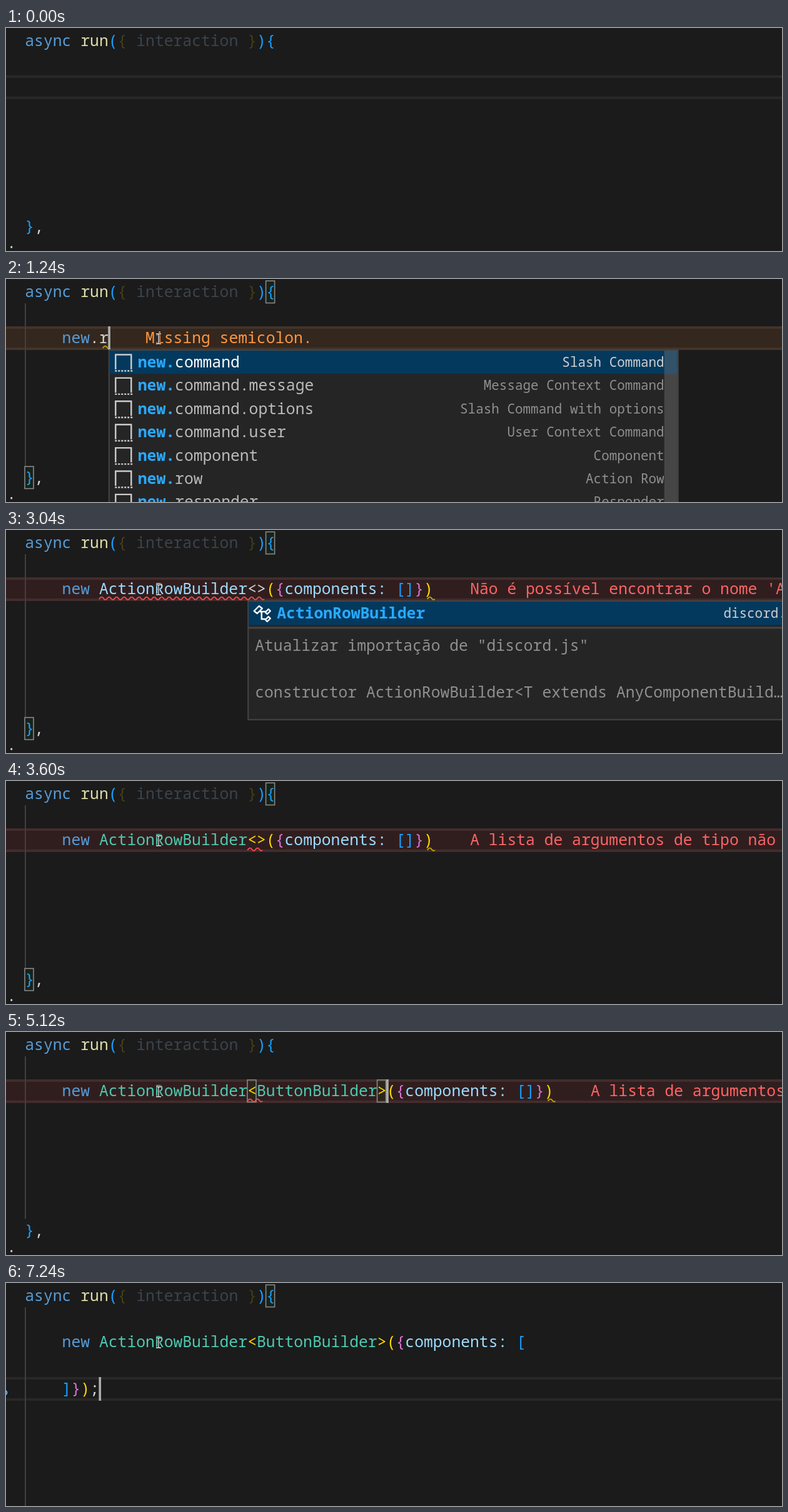
Write an HTML page that moves like this. It is 1241 px wide and 358 px high and loops after 7.32 s.

```html
<!DOCTYPE html>
<html lang="en">
<head>
<meta charset="utf-8">
<title>Editor snippet demo</title>
<style>
  html, body { margin: 0; width: 100%; height: 100%; overflow: hidden; background: #1b1b1b; }
  svg { display: block; width: 1241px; height: 358px; }
  text {
    font: 24.7px "Noto Sans Mono", "DejaVu Sans Mono", monospace;
    font-variant-ligatures: none;
    white-space: pre;
  }
  .bold { font-weight: 700; }
  .small { font-size: 20.95px; }
</style>
</head>
<body>
<svg id="stage" viewBox="0 0 1241 358"></svg>
<script>
const LOOP = 7320, CELL = 14.83;
const C = {
  key: '#569cd6', fn: '#dcdcaa', id: '#9cdcfe', type: '#4ec9b0', plain: '#d4d4d4',
  gold: '#ffd700', pink: '#da70d6', blue: '#179fff', dimGold: '#443f17', dim: '#3b434b',
  match: '#2aaaff', label: '#bbbbbb', note: '#8f8f8f', error: '#ff6464', warn: '#ff9640'
};
const TONES = {
  plain: { fill: 'none', edge: '#282828' },
  warn: { fill: '#33271e', edge: '#43342a', text: C.warn },
  error: { fill: '#301e1f', edge: '#432c2d', text: C.error }
};

const colX = col => 30.3 + col * CELL;
const rowY = row => Math.round(1.7 + row * 37.3);
const esc = s => s.replace(/&/g, '&amp;').replace(/</g, '&lt;');
const rect = (x, y, w, h, fill, more = '') =>
  `<rect x="${x}" y="${y}" width="${w}" height="${h}" fill="${fill}" ${more}/>`;
const path = (d, stroke, width = 2, more = '') =>
  `<path d="${d}" fill="none" stroke="${stroke}" stroke-width="${width}" ${more}/>`;
const text = (x, y, s, fill, more = '') =>
  `<text x="${x}" y="${y}" fill="${fill}" xml:space="preserve" ${more}>${esc(s)}</text>`;

function tokens(row, col, list) {
  let out = '';
  for (const [s, fill] of list) {
    out += text(colX(col), rowY(row) + 27, s, fill);
    col += s.length;
  }
  return out;
}

function squiggle(x1, x2, y, color) {
  let d = `M${x1} ${y + 3}`;
  for (let x = x1, up = true; x + 6 <= x2 + 2; x += 6, up = !up)
    d += `q3 ${up ? -5 : 5} 6 ${up ? -2.5 : 2.5}`;
  return path(d, color, 1.8);
}

// Completion popup
const ICONS = {
  keyword: () => path('M2 2H13V7H2ZM17 4H26M0 12H11M15 12H25M0 18H6M11 18H29M0 24H14M18 24H28', '#fff', 2.5),
  snippet: () => path('M3 25V1.5H28V25', '#ccc', 2.4) + path('M2 27.5H30', '#ccc', 2.4, 'stroke-dasharray="3 2"'),
  value: c => path('M7 5H2V24H7M23 5H28V24H23', c, 2.2) +
    path('M8 13L15 9L22 12L21 18L15 21L8 18ZM8 13L15 16L22 12M15 16V21', c, 2),
  iface: c => `<circle cx="4" cy="14" r="4.2" fill="${c}"/><circle cx="22" cy="14" r="5.6" fill="none" stroke="${c}" stroke-width="2.3"/>` +
    path('M8 14H16', c, 2.3),
  cls: c => path('M2 10L10 2L15 6L7 14ZM11 11H20M14 11V23H20M20 12L25 7L28 10L23 15ZM20 24L25 19L28 22L23 27Z', c, 2.4, 'stroke-linejoin="round"')
};
const ICON_COLORS = { value: '#75beff', iface: '#75beff', cls: '#ee9d28' };

function popup({ col, items, hits, right, notes, scroll }) {
  const x = colX(col) + 1, w = right - x, end = 114 + items.length * 37.4 + 5;
  let out = rect(x, 114, w, end - 114, '#252526', 'stroke="#454545" stroke-width="2"');
  out += rect(x + 1, 115, w - 2, 37.4, '#04395e');
  items.forEach(([icon, name, detail = ''], i) => {
    const top = 115 + i * 37.4, on = i === 0;
    const color = on ? '#fff' : ICON_COLORS[icon];
    out += `<g transform="translate(${x + 7.5} ${top + 5})">${ICONS[icon](color)}</g>`;
    out += text(x + 46, top + 27, name.slice(0, hits), C.match, 'class="bold"');
    out += text(x + 46 + hits * CELL, top + 27, name.slice(hits), on ? '#fff' : C.label);
    out += text(right - 22, top + 26, detail, on ? '#d0d0d0' : C.note, 'class="small" text-anchor="end"');
  });
  if (scroll) out += rect(right - 22, 115, 21, 243, 'rgba(121,121,121,.4)');
  if (notes) {
    out += rect(x, 157.5, w, notes.bottom - 158, '#252526', 'stroke="#454545" stroke-width="2"');
    notes.lines.forEach((s, i) => { out += text(x + 11, 193.5 + i * 37.6, s, C.note); });
  }
  return out;
}

const NEW_ITEMS = [
  ['keyword', 'new'],
  ['snippet', 'new', 'New Statement'],
  ['snippet', 'new.command', 'Slash Command'],
  ['snippet', 'new.command.message', 'Message Context Command'],
  ['snippet', 'new.command.options', 'Slash Command with options'],
  ['snippet', 'new.command.user', 'User Context Command'],
  ['snippet', 'new.component', 'Component'],
  ['snippet', 'new.row', 'Action Row'],
  ['snippet', 'new.responder', 'Responder']
];
const BU_ITEMS = [
  ['value', 'ButtonBuilder'], ['value', 'ButtonStyle'], ['value', 'Buffer'],
  ['iface', 'BufferConstructor'], ['cls', 'BufferEncoding'], ['cls', 'BufferSource'],
  ['cls', 'BufferResolvable', 'discord.js']
];
const BUT_ITEMS = [
  ['value', 'ButtonBuilder'], ['value', 'ButtonStyle'], ['value', 'ButtonComponent'],
  ['iface', 'ButtonComponentData'], ['value', 'ButtonInteraction'],
  ['cls', 'ButtonKind'], ['cls', 'ButtonModifier', 'discord.js']
];
const newList = (col, hits, from = 0) =>
  ({ col, hits, items: NEW_ITEMS.slice(from), right: 1045 + (col - 7) * CELL, scroll: true });
const buList = (col, items) => ({ col, hits: col - 25, items, right: 1340 + (col - 27) * CELL, scroll: true });
const rowPopup = {
  col: 11, hits: 7, right: 1118, items: [['snippet', 'new.row', 'Action Row']],
  notes: { bottom: 323, lines: ['Action Row', '', 'new ActionRowBuilder<>({components: []})'] }
};
const importPopup = {
  col: 24, hits: 16, right: 1295, items: [['cls', 'ActionRowBuilder', 'discord.js']],
  notes: { bottom: 305, lines: ['Atualizar importação de "discord.js"', '',
    'constructor ActionRowBuilder<T extends AnyComponentBuild…'] }
};

// Code on the edited line
const word = s => s.startsWith('new') ? [['new', C.key], [s.slice(3), C.plain]] : [[s, C.id]];
const call = (type, angle, arg) => [
  ['new ', C.key], ['ActionRowBuilder', type], ['<', angle], [arg, C.type], ['>', angle],
  ['(', C.gold], ['{', C.pink], ['components', C.id], [': ', C.id], ['[', C.blue]
];
const close = [[']', C.blue], ['}', C.pink], [')', C.gold]];
const typed = (arg, type = C.type, angle = C.gold) => [...call(type, angle, arg), ...close];

const MISSING = 'Missing semicolon.';
const NO_NAME = "Não é possível encontrar o nome 'ActionRowBuilder'.";
const NO_ARGS = 'A lista de argumentos de tipo não pode estar vazia.';
const OUTER = [[0, 26], [8, 0]];
const angles = n => [[2, 24], [2, 25 + n]];
const BRACES = [[2, 40], [2, 55]], SQUARES = [[2, 53], [2, 54]];

const start = {
  code: [], tail: [], tone: 'plain', msg: '', line: 2, caret: null, boxes: [], red: null,
  list: null, mouse: null, guide: false, inner: false, parse: false, stop: false, bulb: false
};
const steps = [
  [0, {}],
  [80, { mouse: [1108, 200] }],
  [160, { mouse: [850, 160] }],
  [240, { mouse: [560, 122] }],
  [320, { mouse: [350, 100] }],
  [400, { mouse: [244, 96] }],
  [440, { guide: true, boxes: OUTER, caret: 0 }],
  [520, { caret: 4 }],
  [800, { code: word('n'), caret: 5, parse: true }],
  [840, { list: newList(5, 1) }],
  [920, { code: word('ne'), caret: 6, list: newList(6, 2) }],
  [1000, { code: word('new'), caret: 7, list: newList(7, 3) }],
  [1120, { code: word('new.'), caret: 8, list: newList(8, 4, 2) }],
  [1160, { code: word('new.r'), caret: 9, list: newList(9, 4, 2) }],
  [1240, { parse: false, tone: 'warn', msg: MISSING }],
  [1440, { code: word('new.ro'), caret: 10, list: { ...rowPopup, col: 10, hits: 6 } }],
  [1520, { code: word('new.row'), caret: 11, list: rowPopup }],
  [1720, { code: typed('', C.id, C.plain), caret: 25, list: null, stop: true }],
  [2000, { tone: 'error', msg: NO_NAME }],
  [2080, { red: [24 - 16, 26] }],
  [2200, { caret: null }],
  [2600, { caret: 24, stop: false }],
  [2800, { list: importPopup }],
  [3040, { caret: null }],
  [3120, { list: null, caret: 24 }],
  [3240, { code: typed('', C.type, C.plain) }],
  [3520, { code: typed(''), msg: NO_ARGS, red: [24, 26] }],
  [3600, { caret: null }],
  [4040, { caret: 25, boxes: angles(0) }],
  [4120, { code: typed('B'), caret: 26, boxes: angles(1) }],
  [4200, { list: buList(26, BU_ITEMS) }],
  [4320, { code: typed('Bu'), caret: 27, boxes: angles(2), list: buList(27, BU_ITEMS) }],
  [4440, { code: typed('But'), caret: 28, boxes: angles(3), list: buList(28, BUT_ITEMS) }],
  [4640, { code: typed('ButtonBuilder'), caret: 38, boxes: angles(13), list: null }],
  [5120, { caret: 39 }],
  [5200, { red: null, tone: 'warn', msg: MISSING }],
  [5280, { caret: 40, boxes: BRACES }],
  [5360, { caret: 41 }],
  [5440, { caret: 51 }],
  [5640, { caret: 52 }],
  [6040, { caret: 53, boxes: SQUARES }],
  [6240, { caret: 54 }],
  [6520, { code: call(C.type, C.gold, 'ButtonBuilder'), tail: close, line: 3, caret: 8,
    tone: 'plain', msg: '', boxes: [] }],
  [6840, { boxes: [[2, 53], [4, 4]], inner: true }],
  [7120, { line: 4, caret: 4, inner: false }],
  [7160, { caret: 7, boxes: OUTER.slice(0, 1) }],
  [7240, { tail: [...close, [';', C.plain]], caret: 8, bulb: true }]
];
let last = start;
const states = steps.map(([at, change]) => ({ at, s: last = { ...last, ...change } }));

const HEADER = [
  ['async ', C.key], ['run', C.fn], ['(', C.blue], ['{ ', C.dimGold], ['interaction', C.dim],
  [' }', C.dimGold], [')', C.blue], ['{', C.blue]
];

function draw(s) {
  const split = s.tail.length > 0, top = rowY(s.line), tone = TONES[s.tone];
  const end = 4 + s.code.reduce((n, [t]) => n + t.length, 0);
  let out = rect(0, 0, 1241, 358, '#1b1b1b');

  out += rect(0, top, 1241, 38, tone.fill);
  out += rect(0, top, 1241, 4, tone.edge) + rect(0, top + 34, 1241, 4, tone.edge);
  if (s.parse) out += rect(0, 300, 1241, 37, TONES.error.fill);
  if (s.guide) out += rect(30, 39, 2, split ? 319 : 261, '#404040');
  if (s.inner) out += rect(89.5, 114, 2, 37, '#404040');
  for (const [row, col] of s.boxes)
    out += rect(colX(col) - .3, rowY(row) + 1, CELL - .8, 35.5, 'rgba(0,100,0,.1)', 'stroke="#888" stroke-width="1.6"');

  out += tokens(0, 0, HEADER) + tokens(2, 4, s.code) + tokens(4, 4, s.tail);
  if (!split) out += tokens(8, 0, [['}', C.blue], [',', C.plain]]) + tokens(9, -2, [[';', C.plain]]);

  if (s.parse) {
    out += tokens(8, 6, [['Parsing error: Expression expected.', C.error]]);
    out += squiggle(5, 21, 331, '#f14c4c');
  }
  if (s.red) out += squiggle(colX(s.red[0]), colX(s.red[1]) - 2, 108, '#f14c4c');
  if (s.msg) {
    out += tokens(2, end + 4, [[s.msg, tone.text]]);
    out += squiggle(colX(end) - 9, colX(end) + 5, 108, '#bfa500');
  }
  if (s.stop) out += rect(colX(end) - 2.5, 74, 4, 42, '#50504a');
  if (s.bulb) out += `<circle cx="-2" cy="176" r="3.5" fill="none" stroke="#75beff" stroke-width="1.8"/>`;
  if (s.caret !== null) out += rect(colX(s.caret) - .5, top, 3.6, 38, '#aeafad');
  if (s.list) out += popup(s.list);
  if (s.mouse) {
    const beam = `M${s.mouse[0] - 4} ${s.mouse[1] - 8}h3l1 1l1 -1h3m-4 1v14m-4 1h3l1 -1l1 1h3`;
    out += path(beam, '#111', 3) + path(beam, '#eee', 1.3);
  }
  return out;
}

const stage = document.getElementById('stage');
let shown = null;
function tick() {
  const t = performance.now() % LOOP;
  const now = states.filter(e => e.at <= t).pop();
  if (now !== shown) {
    stage.innerHTML = draw(now.s);
    shown = now;
  }
  requestAnimationFrame(tick);
}
tick();
</script>
</body>
</html>
```
